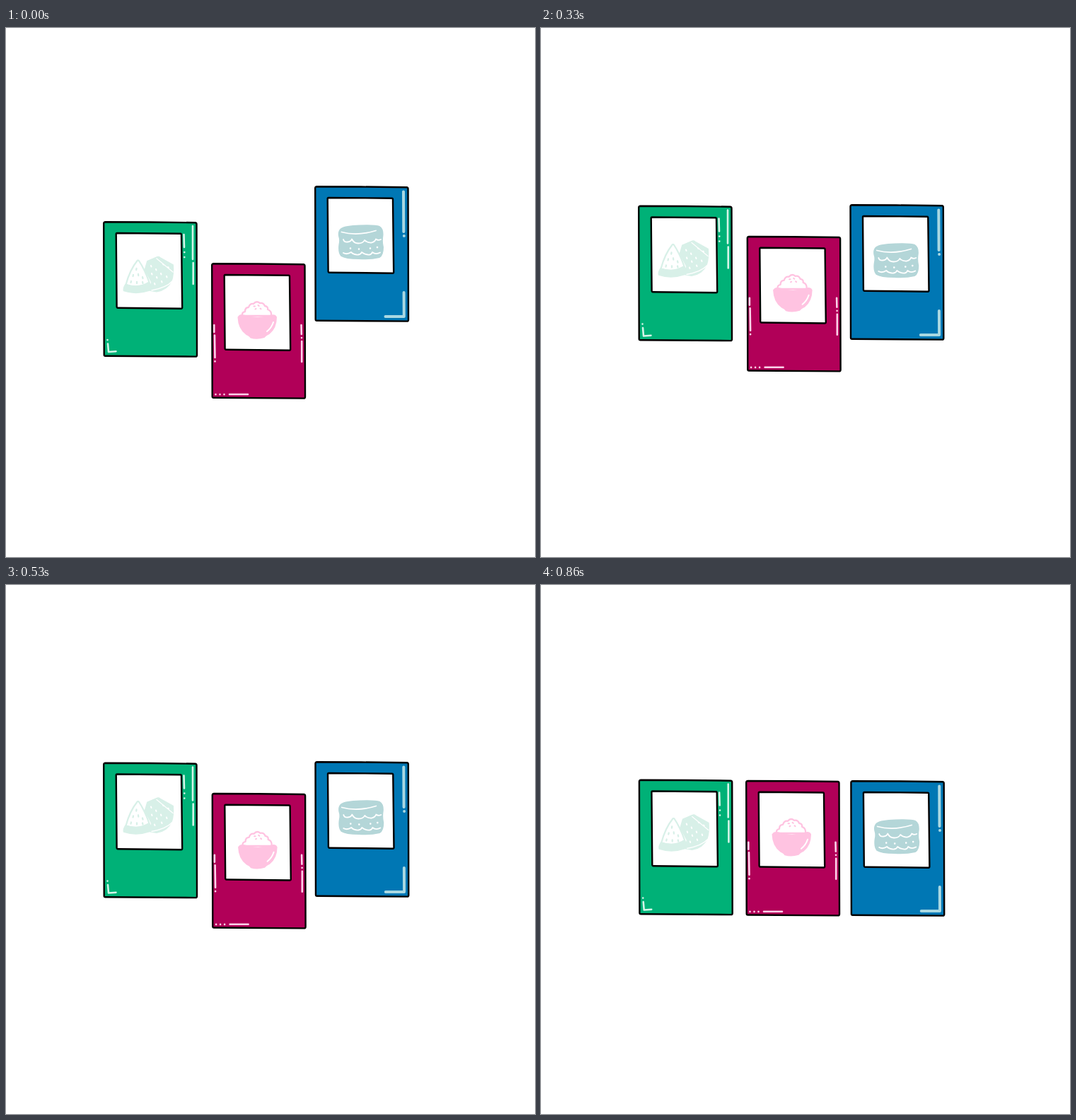
An HTML page that plays this animation: 748x748 px, repeating every 0.99 s.

```html
<!DOCTYPE html>
<html lang="en">
<head>
<meta charset="utf-8">
<title>Three cards</title>
<style>
html, body { margin: 0; width: 100%; height: 100%; overflow: hidden; background: #fff; }
svg { display: block; width: 100%; height: 100%; }
path { fill: none; stroke-linecap: round; stroke-linejoin: round; }
.edge { stroke: #000; stroke-width: 2.4; }
.pane { fill: #fff; }
.shine { stroke-width: 2.6; }
.wide { stroke-width: 4; }
.mint { stroke: #d8f0e8; }
.pink { stroke: #ffc3e1; }
.aqua { stroke: #b4d6d8; }
.white { stroke: #fff; }
path.mintFill { fill: #d8f0e8; }
path.pinkFill { fill: #ffc3e1; }
path.aquaFill { fill: #b4d6d8; }
path.whiteFill { fill: #fff; }
</style>
</head>
<body>
<svg viewBox="0 0 748 748">
  <defs>
    <g id="frame">
      <path class="edge" style="fill:inherit" d="M3.5 1.2L66 1.5L130.500 2.200Q132.500 2.200 132.500 4.500L133 189.500Q133 191.700 131 191.600L3.500 190.700Q1.700 190.700 1.700 189L1.200 3.500Q1.200 1.200 3.500 1.200Z"/>
      <path class="edge pane" d="M20 17L109.500 17.700Q111 17.700 111 19.500L112.200 122.500Q112.200 123.700 111 123.700L21 122.700Q19.700 122.700 19.600 121L18.700 18.500Q18.700 17 20 17Z"/>
    </g>
  </defs>

  <g id="green">
    <use href="#frame" x="137" y="273" fill="#00b177"/>
    <path class="shine" stroke="#d5f5e8" d="M264 280V327M264.700 332V362M251.500 292L252 310M252.300 317v.1M252.300 324v.1M143.500 441v.1M144 446.500L145 458L155.500 457.200"/>
    <path class="mint mintFill" stroke-width="2" d="M200 330L214 324Q216 323.500 218 325L236 335Q237 348 234 357Q228 370 213 372.500L204 371Q206 367 204 361L196 344Z"/>
    <path class="white" stroke-width="1.300" d="M213 326L236 345M235 358Q227 367 206 371"/>
    <path class="white" stroke-width="2" d="M205 336l.5 1.500M206 347l.5 1.500M212 341l.5 1.500M213 352l.5 1.500M219 347l.5 1.500M220 358l.5 1.500M227 351l.5 1.500M210 361l.5 1.500M222 334l1 .7M229 338l1 .7"/>
    <path class="white whiteFill" stroke-width="4" d="M186 328L169 363Q188 369 203 360Z"/>
    <path class="mint whiteFill" stroke-width="2.200" d="M186 328.500Q175 342 169.500 363Q188 369 202.500 359.500Q196 341 187.500 328.500Z"/>
    <path class="mint mintFill" stroke-width="1.500" d="M169 362.500Q188 369 203 360Q205 365 203 371Q184 377.500 166.500 371.500Q165.500 368 169 362.500Z"/>
    <path class="mint" stroke-width="2.300" d="M184.500 340l-.3 2M180 349l-.5 2M187 348l.2 2M177 358l-.5 2M185 359v2M193 352l.5 2M193 359l.5 2"/>
  </g>

  <g id="red">
    <use href="#frame" x="290" y="332" fill="#b10058"/>
    <path class="shine" stroke="#ffd3ea" d="M294.300 420V430M295 434.500L295.500 466M295.500 471.300v.1M296.500 518v.1M302.500 518v.1M308.500 518v.1M316 518H342M417.500 420L417.800 433M418 438v.1M418.200 443V472"/>
    <path class="pink whiteFill" stroke-width="2.300" d="M334 407Q333 402 338 401Q338 395 343 395Q345 389 350 390Q354 385 359 389Q364 388 366 393Q371 394 370 398Q376 400 375 407Z"/>
    <path class="pink pinkFill" stroke-width="2" d="M328.500 409Q331 405 336 406.500Q355 412.500 374 407Q380 405 382 409Q382 424 372 432Q366 435 365 437Q355 440 346 437.500Q345 435 340 433Q329 425 328.500 409Z"/>
    <path class="pink" stroke-width="2" d="M350.500 393.500h1.500M356.500 392l1.200 1M352.500 397.500l1-.6M359.500 396.500l1 .8"/>
    <path class="white" stroke-width="2" d="M378 416Q375.500 424 369 429"/>
  </g>

  <g id="blue">
    <use href="#frame" x="436" y="223" fill="#0077b4"/>
    <path class="wide" stroke="#a9d8e2" d="M562 231.500L562.300 288M562.800 294v.1M562.600 374L562.800 408H536.500"/>
    <path class="aqua aquaFill" stroke-width="2" d="M474 284Q480 280 500 279.500Q522 278.500 528 281Q533 284 532.500 293Q531 302 533 310Q533 321 528 324Q515 327 499 326Q480 326 474 322Q470 317 471.500 306Q473 300 471 294Q470 287 474 284Z"/>
    <path class="white" stroke-width="1.800" d="M474.500 288.500Q497 294.500 523 286.500M477 299Q478 303 483 302.500Q488 302 489 298.500Q492 304.500 498 304.500Q505 304.500 507 300Q511 304 517 303.500Q522 302 523 298.500Q526 301 530 299M477 318Q482 321 488 317Q492 321 498 320.500Q502 320 503 317Q508 321 514 320.500Q517 320 518 317Q523 321 529 317.500"/>
    <path class="white" stroke-width="2.600" d="M487 311.500v.1M499 312.500v.1M515 311.500v.1M525 310v.1"/>
  </g>
</svg>
<script>
const STEP = 330;
// Offset of each card at each step
const poses = {
  green: [[0, 0], [0, -22.5], [0.7, 1.5]],
  red: [[0, 0], [0.6, -38.2], [-1, -56.2]],
  blue: [[0, 0], [0.3, 26], [1.2, 53]]
};
const cards = Object.entries(poses).map(([id, steps]) => [document.getElementById(id), steps]);

function draw() {
  const step = Math.floor(performance.now() / STEP) % 3;
  for (const [card, steps] of cards) {
    card.setAttribute("transform", `translate(${steps[step]})`);
  }
  requestAnimationFrame(draw);
}
draw();
</script>
</body>
</html>
```
